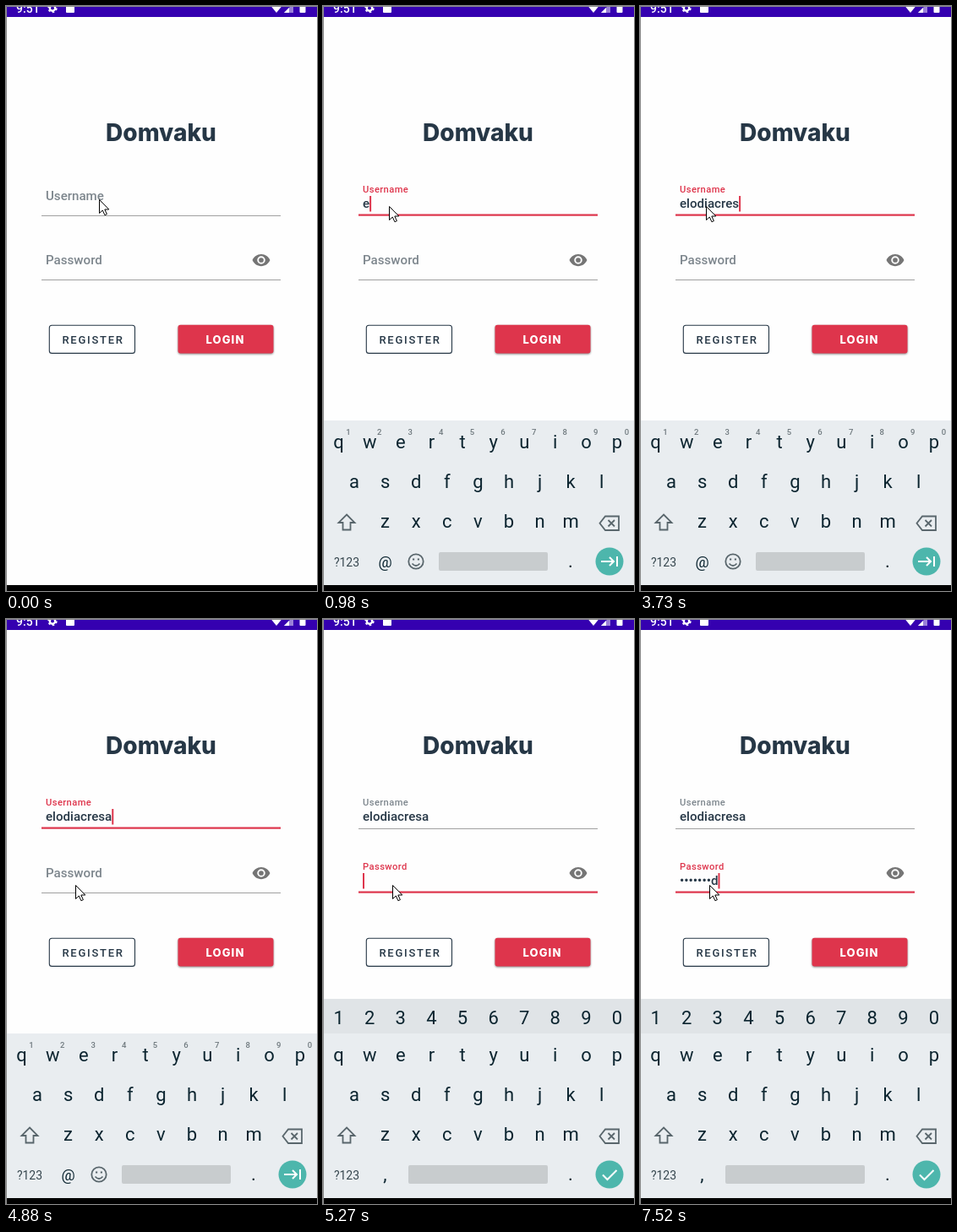
An HTML page for the animation above (8000 ms loop, 368x693 px).

```html
<!DOCTYPE html>
<html lang="en">
<head>
<meta charset="utf-8">
<title>Login screen</title>
<style>
  html, body { margin: 0; width: 100%; height: 100%; overflow: hidden; background: #fefefe; }
  svg { display: block; width: 368px; height: 693px; font-family: Roboto, sans-serif; }
  .mid { text-anchor: middle; }
  .key { font-size: 22px; fill: #0c2530; text-anchor: middle; }
  .hint { font-size: 9.5px; font-weight: 500; fill: #6f797e; text-anchor: middle; }
  .icon { fill: none; stroke: #59666c; stroke-width: 1.8; }
  .white { fill: none; stroke: #fff; stroke-width: 2; }
  .label, .value { font-weight: 500; }
  .value { font-size: 15.1px; fill: #263746; }
  .brand { font-family: Inter, sans-serif; font-weight: 800; }
</style>
</head>
<body>
<svg viewBox="0 0 368 693">
  <rect width="368" height="693" fill="#fefefe"/>

  <rect width="368" height="13" fill="#3500b0"/>
  <g fill="#fff">
    <text x="12" y="7.5" font-size="14" font-weight="500">9:51</text>
    <circle cx="55" cy="2.5" r="3.2" fill="none" stroke="#fff" stroke-width="2.4"/>
    <circle cx="55" cy="2.5" r="4.9" fill="none" stroke="#fff" stroke-width="1.6" stroke-dasharray="2.6 2.53"/>
    <rect x="71" y="-3" width="10" height="11" rx="1"/>
    <path d="M313.5 0h13l-6.5 8z"/>
    <path d="M329 8L340-3V8z" opacity=".5"/>
    <path d="M329 8l6-6v6z"/>
    <rect x="347.5" y="-4" width="7" height="12" rx="1"/>
  </g>

  <text class="brand mid" x="183.5" y="160" font-size="28" fill="#263746">Domvaku</text>
  <g id="fields"></g>
  <path transform="translate(290.6 289.6) scale(.95)" fill="#757575" fill-rule="evenodd"
    d="M12 4.5C7 4.5 2.73 7.61 1 12c1.73 4.39 6 7.5 11 7.5s9.27-3.11 11-7.5c-1.73-4.39-6-7.5-11-7.5zM7 12a5 5 0 1 0 10 0a5 5 0 1 0-10 0zM9 12a3 3 0 1 0 6 0a3 3 0 1 0-6 0z"/>

  <rect x="51.3" y="378.2" width="101.2" height="33.2" rx="3" fill="#fff" stroke="#263746" stroke-width="1.1"/>
  <text x="66.5" y="400" font-size="13" font-weight="500" letter-spacing="1.75" fill="#263746">REGISTER</text>
  <rect x="203.5" y="377.7" width="113" height="33.8" rx="3" fill="#de354c" style="filter:drop-shadow(0 1px 1px #0007)"/>
  <text class="brand" x="236.5" y="400" font-size="13" letter-spacing="1.1" fill="#fff">LOGIN</text>

  <rect y="686" width="368" height="7"/>
  <g id="keyboard">
    <rect y="491" width="368" height="195" fill="#e9edf0"/>
    <g id="letters"></g>
    <path class="icon" d="M28 602.5l9.5 9.5h-5v8.5h-9v-8.5h-5z"/>
    <path class="icon" d="M334 604.5h16v16.5h-16l-6.5-8.2zM337.5 609l7.5 7.5m0-7.5l-7.5 7.5"/>
    <text class="mid" x="28" y="663.7" font-size="14" fill="#37474f">?123</text>
    <text class="key" x="293" y="664.7">.</text>
    <circle cx="339" cy="658" r="16.5" fill="#4db6ac"/>
    <g id="plainKeys">
      <text class="key" x="73.5" y="664.7" style="font-size:18px">@</text>
      <circle class="icon" cx="110" cy="658" r="8.7"/>
      <path class="icon" d="M105.5 660.5q4.5 5 9 0M106 655.5h2.2m3.6 0h2.2"/>
      <rect x="137" y="647" width="129" height="22" rx="2" fill="#c8ccce"/>
      <path class="white" d="M329 658h15m-5-5l5 5l-5 5M348 652v12"/>
    </g>
    <g id="secretKeys">
      <rect y="450" width="368" height="41" fill="#e0e4e7"/>
      <text class="key" x="73.5" y="664.7">,</text>
      <rect x="101" y="647" width="165" height="22" rx="2" fill="#c8ccce"/>
      <path class="white" d="M331 658.5l5.5 5.5l11-11"/>
    </g>
  </g>

  <path d="M368 .5H.5V693" fill="none" stroke="#8c8c8c"/>
  <path id="pointer" fill="#fff" stroke="#000" d="M.5.5v16l3.8-3.5l2.6 5.7l2.5-1.1l-2.6-5.6h5z"/>
</svg>
<script>
const $ = id => document.getElementById(id);
const RED = '#de354c', GREY = '#7d868d', PITCH = 36.6, LOOP = 8000;

function add(parent, tag, attrs, text = '') {
  const el = document.createElementNS('http://www.w3.org/2000/svg', tag);
  set(el, attrs);
  el.textContent = text;
  return parent.appendChild(el);
}
function set(el, attrs) {
  for (const name in attrs) el.setAttribute(name, attrs[name]);
}

function addKeys(parent, chars, x, y, cls = 'key') {
  [...chars].forEach((c, i) => add(parent, 'text', { class: cls, x: x + i * PITCH, y }, c));
}
addKeys($('letters'), 'qwertyuiop', 18.6, 523.8);
addKeys($('letters'), 'asdfghjkl', 37, 570.8);
addKeys($('letters'), 'zxcvbnm', 73.5, 618.2);
addKeys($('plainKeys'), '1234567890', 30, 508, 'hint');
addKeys($('secretKeys'), '1234567890', 18.6, 480);

function makeField(name, top) {
  const g = add($('fields'), 'g', { transform: `translate(0 ${top})` });
  const line = add(g, 'rect', { x: 42, width: 283 });
  const label = add(g, 'text', { class: 'label', x: 47 }, name);
  const value = add(g, 'text', { class: 'value', x: 47, y: 26 });
  const caret = add(g, 'rect', { y: 12, width: 2, height: 18.5, fill: RED });
  return (text, focused, lift, caretOn) => {
    set(line, { y: focused ? 33.5 : 35, height: focused ? 2.2 : 1, fill: focused ? RED : '#a0a0a0' });
    set(label, {
      y: 17 - 9 * lift,
      'font-size': 15.1 - 3.9 * lift,
      'letter-spacing': 0.4 * lift,
      fill: focused ? RED : GREY
    });
    value.textContent = text;
    const width = text ? value.getComputedTextLength() : 0;
    set(caret, { x: 47 + width, visibility: caretOn ? 'visible' : 'hidden' });
  };
}
const drawUser = makeField('Username', 213);
const drawSecret = makeField('Password', 289);

const userTimes = [980, 1260, 1690, 1880, 2080, 2460, 2740, 3020, 3450, 3730, 3850];
const secretTimes = [5790, 6070, 6320, 6590, 6780, 6970, 7240, 7520];
const typed = (text, times, t) => text.slice(0, times.filter(at => t >= at).length);
const within = (t, ...spans) => spans.some(([from, to]) => t >= from && t < to);
const show = (el, on) => set(el, { visibility: on ? 'visible' : 'hidden' });

function pointerAt(t) {
  if (t < 120) return [110, 229];
  const step = Math.floor((t - 4480) / 130) + 1;
  const k = Math.max(0, Math.min(1, step / 4));
  return [78 + 4 * k, 237 + 78 * k];
}

function draw(t) {
  const userFocus = within(t, [270, 5130]);
  const secretFocus = t >= 5130;
  drawUser(typed('elodiacresa', userTimes, t), userFocus, t < 270 ? 0 : 1,
    within(t, [270, 830], [980, 4350], [4880, 5130]));

  const secret = typed('password', secretTimes, t);
  drawSecret('•'.repeat(Math.max(0, secret.length - 1)) + secret.slice(-1), secretFocus,
    t < 5130 ? 0 : t < 5270 ? 0.5 : 1, within(t, [5130, 5640], [5790, LOOP]));

  const rising = within(t, [830, 980]);
  set($('keyboard'), {
    display: t < 830 ? 'none' : 'inline',
    opacity: rising ? 0.6 : 1,
    transform: `translate(0 ${rising ? 45 : 0})`
  });
  show($('plainKeys'), t < 5270);
  show($('secretKeys'), t >= 5270);
  set($('pointer'), { transform: `translate(${pointerAt(t)})` });
}

let start;
function tick(now) {
  start ??= now;
  draw((now - start) % LOOP);
  requestAnimationFrame(tick);
}
draw(0);
requestAnimationFrame(tick);
</script>
</body>
</html>
```
